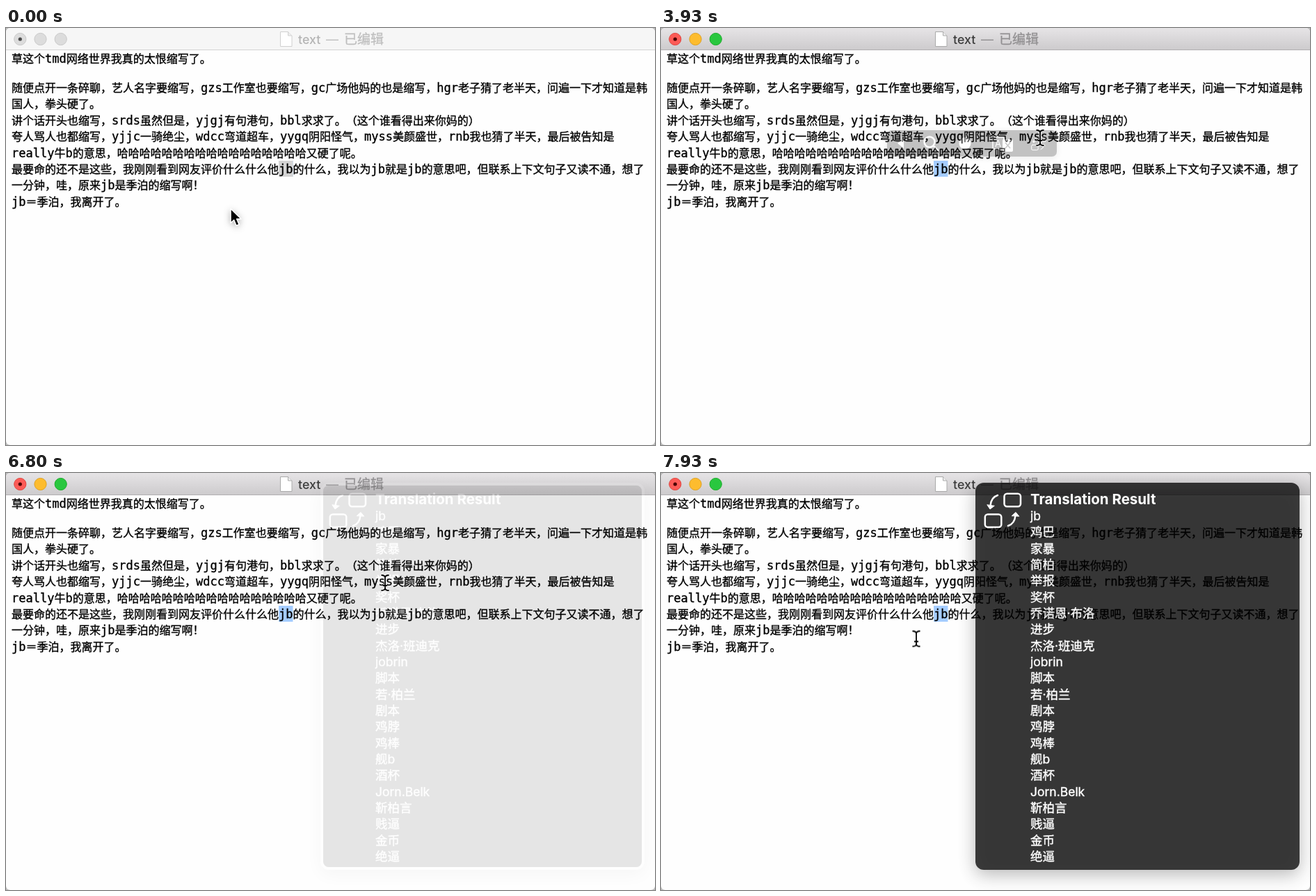
These frames come from a looping animation (933 px wide and 600 px high, 8000 ms). An HTML page:

```html
<!DOCTYPE html>
<html lang="zh-CN">
<head>
<meta charset="utf-8">
<title>text</title>
<style>
html, body { margin: 0; width: 100%; height: 100%; overflow: hidden; background: #bdbdbd; }
svg { display: block; width: 933px; height: 600px; }
text { text-spacing-trim: space-all; white-space: pre; }
.body { font: 16px "Noto Sans CJK SC", "Noto Sans CJK", sans-serif; stroke: #000; stroke-width: .35px; }
.mono { font: 17px "DejaVu Sans Mono", monospace; }
.ui { font-family: Inter, "Noto Sans CJK SC", "Noto Sans CJK", sans-serif; }
.line { fill: none; stroke: #fff; stroke-width: 2.5; stroke-linecap: round; stroke-linejoin: round; }
.shade { filter: drop-shadow(0 2px 5px rgba(0, 0, 0, .3)); }
.deep { filter: drop-shadow(0 7px 13px rgba(0, 0, 0, .36)); }

.inactive, .words, .tools, .wait, .panel, .ring, .edge, .cursor, .arrow, .beam {
  animation: 8s linear infinite;
}
.inactive { animation-name: inactive; }
.words { animation-name: words; }
.tools { animation-name: tools; }
.wait { animation-name: wait; }
.panel { animation-name: panel; }
.ring { animation-name: ring; }
.edge { animation-name: edge; }
.cursor { animation-name: cursor; }
.arrow { animation-name: arrow; }
.beam { animation-name: beam; }
.spin { animation: spin 1s steps(12) infinite; }

@keyframes inactive { 0%, 12.45% { opacity: 1; } 12.46%, 100% { opacity: 0; } }
@keyframes words { 0%, 16.6% { opacity: 0; } 18.3%, 31.6% { opacity: 1; } 31.61%, 100% { opacity: 0; } }
@keyframes tools { 0%, 31.6% { opacity: 0; } 31.61%, 47.5% { opacity: 1; } 49.8%, 100% { opacity: 0; } }
@keyframes wait { 0%, 50% { opacity: 0; } 50.01%, 80.8% { opacity: 1; } 80.81%, 100% { opacity: 0; } }
@keyframes panel {
  0%, 84.9% { opacity: 0; } 84.95% { opacity: .08; } 87.45%, 97.4% { opacity: 1; }
  99.1% { opacity: .84; } 100% { opacity: .74; }
}
@keyframes ring { 0%, 97.45% { opacity: 1; } 97.46%, 100% { opacity: 0; } }
@keyframes edge { 0%, 97.45% { opacity: 0; } 97.46%, 100% { opacity: 1; } }
@keyframes cursor {
  0%, .8% { transform: translate(323px, 260px); animation-timing-function: ease-in-out; }
  8.4%, 24% { transform: translate(401px, 202px); animation-timing-function: ease-in-out; }
  29%, 33% { transform: translate(352px, 166px); animation-timing-function: ease-in-out; }
  41%, 87% { transform: translate(545px, 158px); }
  87.5%, 88.5% { transform: translate(545px, 160px); animation-timing-function: ease-in-out; }
  95%, 100% { transform: translate(367px, 238.5px); }
}
@keyframes arrow {
  0%, 12.45% { opacity: 1; } 12.46%, 26.5% { opacity: 0; }
  26.51%, 48.3% { opacity: 1; } 48.31%, 50% { opacity: 0; }
  50.01%, 80.8% { opacity: 1; } 80.81%, 100% { opacity: 0; }
}
@keyframes beam {
  0%, 12.45% { opacity: 0; } 12.46%, 26.5% { opacity: 1; }
  26.51%, 48.3% { opacity: 0; } 48.31%, 50% { opacity: 1; }
  50.01%, 80.8% { opacity: 0; } 80.81%, 100% { opacity: 1; }
}
@keyframes spin { to { transform: rotate(360deg); } }
</style>
</head>
<body>
<svg viewBox="0 0 933 600">
  <defs>
    <linearGradient id="chrome" x2="0" y2="1">
      <stop stop-color="#e6e4e6"/><stop offset="1" stop-color="#cdcbcd"/>
    </linearGradient>
    <clipPath id="frame"><rect width="933" height="600" rx="6"/></clipPath>
    <g id="swap" class="line">
      <rect x="493.500" y="29.800" width="23.500" height="18.500" rx="4"/>
      <rect x="465.800" y="59.500" width="23.500" height="18.500" rx="4"/>
      <path d="M484 32Q474.500 35 473.500 47M499 76Q508.500 73 509.500 61"/>
      <path d="M469 46L473 52L479 47.500ZM504.500 61.500L510 56.500L514.500 62Z" fill="#fff" style="stroke-width:1"/>
    </g>
    <path id="ibeam" d="M-5.500-11Q0-11 0-7.500V7.500Q0 11-5.500 11M5.500-11Q0-11 0-7.500M5.500 11Q0 11 0 7.500M-3 4H3"/>
  </defs>

  <g clip-path="url(#frame)">
    <rect width="933" height="600" fill="#fefefe"/>
    <g id="active"></g>
    <g id="idle" class="inactive"></g>
    <g id="doc" class="body"></g>
  </g>

  <g class="words ui" font-size="18.5" fill="#fff" text-anchor="middle">
    <rect class="shade" x="333" y="147" width="206" height="38" rx="7" fill="#1a1a1a" fill-opacity=".85"/>
    <path d="M345 167L351.500 160.500L358 167Z"/>
    <text x="399" y="173.500">job</text><text x="457" y="173.500">jab</text><text x="512" y="173.500">jib</text>
  </g>

  <g class="tools ui">
    <rect class="shade" x="325" y="147" width="244" height="38" rx="7" fill="#1a1a1a" fill-opacity=".87"/>
    <path d="M349 159V173L340 166Z" fill="#fff"/>
    <path class="line" d="M392 170L398 176"/>
    <circle class="line" cx="386" cy="164" r="7.500"/>
    <circle cx="437" cy="166" r="8.500" fill="#fff"/>
    <rect class="line" x="477" y="157" width="16" height="17" rx="2" style="stroke-width:1.5"/>
    <rect x="491" y="160" width="15" height="18" rx="2" fill="#fff"/>
    <text x="480" y="170.500" font-size="13" fill="#fff">A</text>
    <path d="M495 165L502 173M502 165L495 173" stroke="#444" stroke-width="1.500"/>
    <use href="#swap" transform="translate(543 166) scale(.4) translate(-491.500 -54)"/>
  </g>

  <g class="wait">
    <rect class="shade" x="519" y="147" width="50" height="38" rx="7" fill="#1a1a1a" fill-opacity=".87"/>
    <g transform="translate(544 166)"><g id="spokes" class="spin"></g></g>
  </g>

  <g class="panel ui" fill="#fff">
    <g class="ring">
      <g class="deep">
        <rect x="454" y="16" width="462" height="553" rx="10" fill="none" stroke="#fff" stroke-width="4"/>
        <rect x="456" y="18" width="458" height="549" rx="8" fill="#000" fill-opacity=".92"/>
      </g>
    </g>
    <g class="edge">
      <rect class="deep" x="452" y="14" width="466" height="557" rx="12" fill="#000" fill-opacity=".92"/>
    </g>
    <use href="#swap"/>
    <text x="531" y="45" font-size="20.5" font-weight="700">Translation Result</text>
    <g id="list" font-size="17.5" stroke="#fff" stroke-width=".4"></g>
  </g>

  <g class="cursor">
    <path class="arrow shade" d="M0 0V20.500L4.700 16.300L8 24.300L12 22.600L8.700 14.800H15Z"
      fill="#000" stroke="#fff" stroke-width="1.500" stroke-linejoin="round"/>
    <g class="beam" fill="none">
      <use href="#ibeam" stroke="#fff" stroke-width="3.500" stroke-opacity=".8"/>
      <use href="#ibeam" stroke="#000" stroke-width="1.800"/>
    </g>
  </g>
</svg>
<script>
const fill = (id, html) => document.getElementById(id).innerHTML = html;

function windowTop({ bar, rule, lights, rims, dot, name, note, page, pick }) {
  const buttons = lights.map((c, i) =>
    `<circle cx="${20.3 + i * 29.2}" cy="16" r="8.6" fill="${c}" stroke="${rims[i]}"/>`).join('');
  return `<rect width="933" height="31" fill="${bar}"/>
    <rect y="31" width="933" height="1" fill="${rule}"/>${buttons}
    <circle cx="20.3" cy="16" r="2.6" fill="${dot}"/>
    <path d="M394.500 5.500H405.500L411 11V26.500H394.500Z" fill="#fff" stroke="${page}"/>
    <path d="M405.500 5.500V11H411" fill="#eee" stroke="${page}"/>
    <g class="ui" font-size="19" fill="${note}">
      <text x="420" y="23" font-size="17.8" font-weight="500" fill="${name}">text</text>
      <text x="460" y="23" font-size="18">—</text>
      <text x="486" y="23" stroke="${note}" stroke-width=".3">已编辑</text>
    </g>
    <rect x="392" y="191" width="20.500" height="23" fill="${pick}"/>`;
}

fill('active', windowTop({
  bar: 'url(#chrome)', rule: '#b1afb1',
  lights: ['#fc5b57', '#fdbc2e', '#29c73f'], rims: ['#e0443e', '#dea123', '#1aab29'],
  dot: '#4d0000', name: '#3c3c3c', note: '#929092', page: '#aaa', pick: '#a5cdff'
}));
fill('idle', windowTop({
  bar: '#f6f6f6', rule: '#d3d3d3',
  lights: Array(3).fill('#dcdcdc'), rims: Array(3).fill('#c9c9c9'),
  dot: '#4a4a4a', name: '#b4b4b4', note: '#bfbfbf', page: '#d0d0d0', pick: '#d4d4d4'
}));

const lines = [
  '草这个tmd网络世界我真的太恨缩写了。',
  '随便点开一条碎聊，艺人名字要缩写，gzs工作室也要缩写，gc广场他妈的也是缩写，hgr老子猜了老半天，问遍一下才知道是韩',
  '国人，拳头硬了。',
  '讲个话开头也缩写，srds虽然但是，yjgj有句港句，bbl求求了。（这个谁看得出来你妈的）',
  '夸人骂人也都缩写，yjjc一骑绝尘，wdcc弯道超车，yygq阴阳怪气，myss美颜盛世，rnb我也猜了半天，最后被告知是',
  'really牛b的意思，' + '哈'.repeat(17) + '又硬了呢。',
  '最要命的还不是这些，我刚刚看到网友评价什么什么他jb的什么，我以为jb就是jb的意思吧，但联系上下文句子又读不通，想了',
  '一分钟，哇，原来jb是季泊的缩写啊！',
  'jb＝季泊，我离开了。'
];
fill('doc', lines.map((s, i) => {
  const y = i ? 92 + (i - 1) * 23.4 : 50;
  return `<text x="8" y="${y}">${s.replace(/[a-z]+/g, '<tspan class="mono">$&</tspan>')}</text>`;
}).join(''));

const results = 'jb 鸡巴 家暴 简柏 举报 奖杯 乔诺恩·布洛 进步 杰洛·班迪克 jobrin 脚本 若·柏兰 剧本 鸡脖 鸡棒 舰b 酒杯 Jorn.Belk 靳柏言 贱逼 金币 绝逼';
fill('list', results.split(' ').map((s, i) =>
  `<text x="531" y="${68 + i * 23.34}">${s}</text>`).join(''));

fill('spokes', Array.from({ length: 12 }, (_, i) =>
  `<path class="line" style="stroke-width:2" d="M0-6V-11" transform="rotate(${-30 * i})" opacity="${Math.max(.12, 1 - i * .13)}"/>`).join(''));
</script>
</body>
</html>
```
